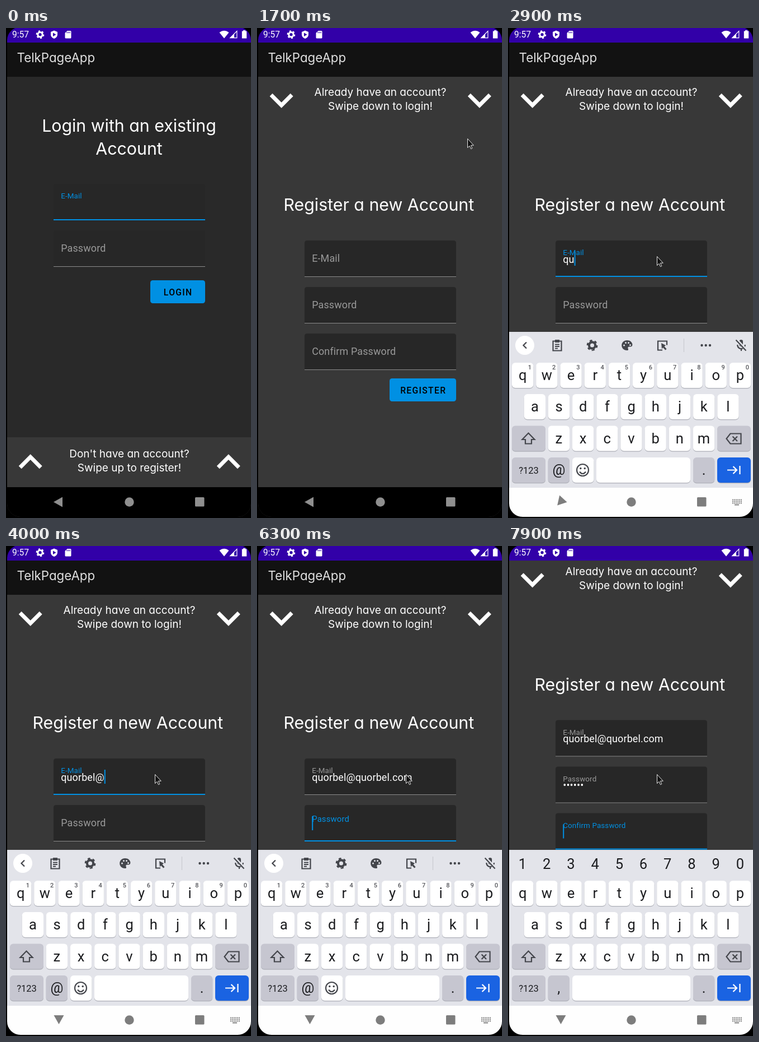
An HTML page that plays this animation: 438 by 874 pixels, repeating every 8000 ms.

```html
<!DOCTYPE html>
<html lang="en">
<head>
<meta charset="utf-8">
<title>Login and register</title>
<style>
html, body { margin: 0; width: 100%; height: 100%; overflow: hidden; background: #000; }
svg { display: block; width: 100%; height: 100%; font-family: Roboto, sans-serif; }
text { white-space: pre; }
.geo { font-family: Inter, sans-serif; font-feature-settings: "cv11" 1; font-optical-sizing: none; fill: #fff; }
.h { font-size: 30.3px; }
.hint { font-size: 19px; }
.mid { text-anchor: middle; }
.in { font-size: 17.9px; letter-spacing: .009em; }
.btn { font-size: 15.6px; font-weight: 500; letter-spacing: .089em; text-anchor: middle; }
.key { font-size: 25.5px; text-anchor: middle; fill: #1b1c1f; }
.sup { font-size: 11px; font-weight: 500; text-anchor: middle; fill: #55565b; }
.line { fill: none; stroke: #44464c; stroke-width: 2.2; }
</style>
</head>
<body>
<svg viewBox="0 0 438 874">
  <defs>
    <clipPath id="screen"><rect x="2" y="-2" width="436" height="874" rx="24"/></clipPath>
  </defs>
  <rect width="438" height="874"/>
  <g clip-path="url(#screen)">
    <rect y="26" width="438" height="794" fill="#292929"/>
    <g id="page">
      <g id="login">
        <g id="loginTitle" class="geo h mid">
          <text x="220" y="185">Login with an existing</text>
          <text x="220" y="226">Account</text>
        </g>
      </g>
      <rect id="panel" width="438" height="900" fill="#383838"/>
      <g id="reg">
        <text id="regTitle" class="geo h" y="326">Register a new Account</text>
      </g>
      <g id="bar">
        <g id="arrows" fill="#fff">
          <path d="M-4.590 3.410L0 -1.170L4.590 3.410L6 2L0 -4L-6 2z"/>
          <path d="M-4.590 3.410L0 -1.170L4.590 3.410L6 2L0 -4L-6 2z"/>
        </g>
        <g class="geo hint mid">
          <text id="hint1" x="220.5" y="766"></text>
          <text id="hint2" x="220.5" y="791"></text>
        </g>
      </g>
      <rect y="20" width="438" height="67" fill="#121212"/>
      <text class="geo" x="19.5" y="61" font-size="22.3" style="fill:#e0e0e0">TelkPageApp</text>
    </g>
    <rect y="-2" width="438" height="28" fill="#3200a8"/>
    <g id="status" fill="#fff">
      <text x="11" y="17.3" font-size="15.6">9:57</text>
      <path d="M86 4.500l6 2.400v4.600q0 5-6 7.600q-6 -2.600-6-7.600v-4.600z"/>
      <path d="M84 8.500l5.500 3.200l-5.500 3.200z" fill="#3200a8"/>
      <path d="M109.500 5h5.500q1.500 0 1.500 1.500v10.500q0 1.500-1.500 1.500h-8q-1.500 0-1.500-1.500v-8z"/>
      <path d="M109 6.800v2.400M111.500 6.800v2.400M114 6.800v2.400" stroke="#3200a8" stroke-width="1.2"/>
      <path d="M390 18.500L381.500 8Q390 1.500 398.500 8z"/>
      <path d="M400.800 17.700H412.800V5.500z" fill="none" stroke="#fff" stroke-width="1.2"/>
      <path d="M400 18L408 10V18z"/>
      <path d="M424 4h4v1.500h2.200v13h-8.400v-13h2.200z"/>
    </g>
    <rect y="819" width="438" height="55"/>
    <g id="board">
      <rect y="542" width="438" height="279" fill="#e3e4ea"/>
      <rect y="820" width="438" height="54" fill="#fefefe"/>
      <g id="keys"></g>
      <g id="mailKeys">
        <circle cx="30" cy="566" r="17" fill="#fff"/>
        <path class="line" d="M33 560.500l-5.500 5.500l5.500 5.500"/>
        <path class="line" d="M80.500 558.500h15v17h-15zM84 564.500h8M84 568h8M84 571.500h5"/>
        <path d="M84 556h8v5h-8z" fill="#44464c"/>
        <path d="M213 557c-13 0-13 18 0 18c3 0 2-2.500 1.500-3.500c-.8-2 .5-3 2-3h2.500c6 0 4-11.500-6-11.500z" fill="#44464c"/>
        <g fill="#e3e4ea"><circle cx="207.500" cy="566" r="1.5"/><circle cx="210.500" cy="561.500" r="1.5"/><circle cx="215.500" cy="561.500" r="1.5"/><circle cx="218.500" cy="565.500" r="1.5"/></g>
        <path class="line" d="M276 574.500h-8v-16h16v7"/>
        <path d="M274 562l8 4l-2.500 2l4 4.500l-2 2l-4.500-4.500l-2 2.500z" fill="#44464c"/>
        <path d="M314.500 554v24" stroke="#c6c7cd"/>
        <g fill="#44464c"><circle cx="346.500" cy="566" r="2.2"/><circle cx="353.700" cy="566" r="2.2"/><circle cx="361" cy="566" r="2.2"/></g>
        <rect x="413.500" y="556" width="6.500" height="12" rx="3.2" fill="#44464c"/>
        <path class="line" d="M410 565q1 7 7 7t7-7M417 572v4"/>
        <path d="M409 556.500l17 18" stroke="#e3e4ea" stroke-width="5"/>
        <path class="line" d="M407.500 556.500l18 19"/>
      </g>
      <g id="passKeys"></g>
      <g id="switcher" fill="#858585"></g>
    </g>
    <g id="nav">
      <path id="back" d="M-9.500 0L6.500 -9V9z"/>
      <circle cx="220.500" cy="845.500" r="8.2"/>
      <rect x="338" y="837" width="16.5" height="16.5" rx="1.5"/>
    </g>
  </g>
  <path id="mouse" d="M.5 .5V16.500L4 13.200L6.500 18.700L8.800 17.600L6.400 12.200H11.300z" fill="#111" stroke="#e8e8e8"/>
</svg>
<script>
const LOOP = 8000, STEP = 100;
const BLUE = '#0090e3', GREY = '#9a9a9a';
const MAIL = 'quorbel@quorbel.com', PASS = '123456';
const $ = id => document.getElementById(id);

// Tables of [time, value...], linear in between
const swipe = [[900, 0], [1000, .02], [1100, .1], [1200, .24], [1300, .4036], [1400, .6], [1500, .8], [1600, .95], [1700, 1]];
const mouse = [[500, 434, 650], [600, 415, 705], [700, 392, 743], [800, 385, 752], [900, 385, 752], [1000, 384, 710],
  [1100, 382, 570], [1200, 380, 390], [1300, 378, 264], [1400, 377, 215], [1700, 376, 197], [1800, 376, 197],
  [1900, 350, 240], [2000, 290, 370], [2100, 266, 407]];
const slide = [[2500, 335], [2600, 240], [2700, 120], [2800, 25], [2900, 0]];
const turn = [[2700, 0], [2800, -15], [2900, -48], [3000, -80], [3100, -90]];
const pan = [[7600, 0], [7700, -14], [7800, -52], [7900, -68.5]];
const mailTimes = [2800, 2900, 3000, 3100, 3400, 3600, 3800, 4000, 4200, 4400, 4500, 4700, 4900, 5300, 5400, 5600, 5800, 5900, 6100];
const passTimes = [6500, 6700, 6900, 7000, 7100, 7300];

const mix = (a, b, p) => a + (b - a) * p;
const typed = (times, t) => times.filter(s => s <= t).length;

function track(rows, t) {
  const i = rows.findIndex(r => r[0] > t);
  if (i === 0) return rows[0].slice(1);
  if (i < 0) return rows[rows.length - 1].slice(1);
  const a = rows[i - 1], b = rows[i], p = (t - a[0]) / (b[0] - a[0]);
  return a.slice(1).map((v, k) => mix(v, b[k + 1], p));
}

function set(el, attrs) {
  for (const k in attrs) el.setAttribute(k, attrs[k]);
}

function add(parent, tag, attrs = {}, text = '') {
  const el = document.createElementNS('http://www.w3.org/2000/svg', tag);
  set(el, attrs);
  el.textContent = text;
  return parent.appendChild(el);
}

const move = (el, x, y, more = '') => el.setAttribute('transform', `translate(${x} ${y}) ${more}`);
const show = (el, on) => { el.style.display = on ? '' : 'none'; };

// Each view fades by itself, so overlapping ones show through
function fade(group, alpha) {
  for (const el of group.children) el.setAttribute('opacity', alpha);
}

function gear(parent, x, y, r, color) {
  const ring = (rad, w, more) => add(parent, 'circle',
    { cx: x, cy: y, r: rad, fill: 'none', stroke: color, 'stroke-width': w, ...more });
  ring(r * .57, r * .42);
  ring(r * .85, r * .32, { pathLength: 12, 'stroke-dasharray': '1 1' });
}

// Filled text field; the returned function sets its geometry and state
function field(parent, name) {
  const g = add(parent, 'g');
  const box = add(g, 'path', { fill: '#272727' });
  const line = add(g, 'rect');
  const label = add(g, 'text', { class: 'in', x: 13.2 }, name);
  const value = add(g, 'text', { class: 'in', x: 13.2, y: 39.5, fill: '#fff' });
  const caret = add(g, 'rect', { y: 20, width: 2, height: 25, fill: BLUE });
  return (x, y, w, { focus = false, float = 0, text = '', caretOn = false } = {}) => {
    move(g, x, y);
    set(box, { d: `M0 65V4.500Q0 0 4.500 0H${w - 4.5}Q${w} 0 ${w} 4.500V65z` });
    const h = focus ? 2 : 1;
    set(line, { y: 65 - h, width: w, height: h, fill: focus ? BLUE : '#8c8c8c' });
    set(label, { y: mix(38.4, 26, float), fill: focus ? BLUE : GREY });
    label.style.fontSize = mix(17.9, 13.4, float) + 'px';
    value.textContent = text;
    show(caret, caretOn);
    if (caretOn) caret.setAttribute('x', 13.2 + (text ? value.getComputedTextLength() : 0));
  };
}

function button(parent, name) {
  const g = add(parent, 'g');
  const box = add(g, 'rect', { height: 41, rx: 4.5, fill: BLUE });
  const text = add(g, 'text', { class: 'btn', y: 26.5 }, name);
  return (x, y, w) => {
    move(g, x, y);
    box.setAttribute('width', w);
    text.setAttribute('x', w / 2 + .7);
  };
}

function key(parent, x, y, w, name = '', fill = '#fff', small = false) {
  add(parent, 'rect', { x, y: y + 1.3, width: w, height: 45, rx: 6, fill: '#aeb0b8' });
  add(parent, 'rect', { x, y, width: w, height: 45, rx: 6, fill });
  const t = add(parent, 'text', { class: 'key', x: x + w / 2, y: y + (small ? 29 : 31) }, name);
  if (small) t.style.fontSize = '16.5px';
}

function buildBoard() {
  const keys = $('keys'), mail = $('mailKeys'), pass = $('passKeys');
  const DARK = '#c6c6d0', pitch = 43.2;
  const row = (chars, x, y) => [...chars].forEach((c, i) => key(keys, x + i * pitch, y, 38.3, c));
  row('qwertyuiop', 7, 597);
  row('asdfghjkl', 28.7, 653);
  row('zxcvbnm', 71.7, 709.5);
  key(keys, 7, 709.5, 60, '', DARK);
  key(keys, 374, 709.5, 60, '', DARK);
  key(keys, 7, 766, 60, '?123', DARK, true);
  key(keys, 331, 766, 38.3, '.', DARK);
  key(keys, 374, 766, 60, '', '#1a63e2');
  const icon = (g, d, more) => add(g, 'path', { class: 'line', d, ...more });
  icon(keys, 'M36.500 722.500l11 11.500h-5.500v7.500h-11v-7.500h-5.500z');
  icon(keys, 'M397.500 723.500h19v18h-19l-7-9zM401.500 728.500l8.500 8.500M410 728.500l-8.500 8.500');
  icon(keys, 'M392 788.500h16M402.500 782l6.500 6.500l-6.500 6.500M414.500 781v15', { style: 'stroke:#fff' });

  [...'1234567890'].forEach((c, i) => {
    add(mail, 'text', { class: 'sup', x: 39 + i * pitch, y: 609 }, c);
    add(pass, 'text', { class: 'key', x: 26 + i * pitch, y: 576 }, c);
  });
  gear(mail, 150.5, 566, 9.8, '#44464c');
  key(mail, 71.7, 766, 38.3, '@', DARK);
  key(mail, 115, 766, 38.3);
  key(mail, 158, 766, 168);
  add(mail, 'circle', { class: 'line', cx: 133.5, cy: 788.5, r: 10.5 });
  icon(mail, 'M128 791.500q5.500 7 11 0');
  for (const cx of [129.8, 137.2]) add(mail, 'circle', { cx, cy: 785.5, r: 1.7, fill: '#44464c' });
  key(pass, 71.7, 766, 38.3, ',', DARK);
  key(pass, 115, 766, 211);

  for (let r = 0; r < 3; r++)
    for (let c = 0; c < 6; c++)
      add($('switcher'), 'rect', { x: 401 + c * 3, y: 840.5 + r * 3, width: 2, height: 2 });
  add($('switcher'), 'rect', { x: 405, y: 849.5, width: 8, height: 2 });
}

const login = { mail: field($('login'), 'E-Mail'), pass: field($('login'), 'Password'), go: button($('login'), 'LOGIN') };
const reg = {
  mail: field($('reg'), 'E-Mail'), pass: field($('reg'), 'Password'),
  again: field($('reg'), 'Confirm Password'), go: button($('reg'), 'REGISTER')
};
gear($('status'), 61, 11.7, 7.3, '#fff');
buildBoard();

function drawLogin(p) {
  const x = mix(85, 1, p), w = mix(271, 439, p), left = mix(258, 4, p);
  fade($('login'), 1 - p);
  move($('loginTitle'), 0, -153 * p);
  login.mail(x, mix(278, 21, p), w, { focus: true, float: 1 });
  login.pass(x, mix(361, 24, p), w);
  login.go(left, mix(450, 43, p), x + w - left);
}

function drawRegister(p, t) {
  const x = mix(3, 85, p), w = mix(435, 271, p);
  const n = typed(passTimes, t);
  fade($('reg'), p);
  set($('regTitle'), { x: mix(1, 47.5, p), y: mix(851, 326, p) });
  const onMail = t >= 2400 && t < 6200, onPass = t >= 6200 && t < 7700, onAgain = t >= 7700;
  reg.mail(x, mix(887, 379, p), w, {
    focus: onMail, float: track([[2300, 0], [2600, 1]], t)[0],
    text: MAIL.slice(0, typed(mailTimes, t)), caretOn: onMail && t >= 2500
  });
  reg.pass(x, mix(885, 462, p), w, {
    focus: onPass, float: track([[6100, 0], [6400, 1]], t)[0],
    text: onAgain ? '•'.repeat(n) : n ? '•'.repeat(n - 1) + PASS[n - 1] : '', caretOn: onPass
  });
  reg.again(x, mix(884, 545, p), w, {
    focus: onAgain, float: track([[7600, 0], [7800, 1]], t)[0], caretOn: onAgain
  });
  reg.go(x + w - 119, mix(891, 625, p), 119);
}

function drawBar(p) {
  const up = p < .5;
  $('panel').setAttribute('y', mix(730, 87, p));
  move($('bar'), 0, -645.5 * p);
  const [a, b] = $('arrows').children;
  move(a, 43.7, 774.2, `rotate(${180 * p}) scale(3.5)`);
  move(b, 397.8, 774.2, `rotate(${-180 * p}) scale(3.5)`);
  $('hint1').textContent = up ? "Don't have an account?" : 'Already have an account?';
  $('hint2').textContent = up ? 'Swipe up to register!' : 'Swipe down to login!';
}

function render(t) {
  const [p] = track(swipe, t);
  drawLogin(p);
  drawBar(p);
  drawRegister(p, t);
  move($('page'), 0, track(pan, t)[0]);

  const open = t >= 2600, digits = t >= 6400, [angle] = track(turn, t);
  show($('board'), open);
  move($('board'), 0, track(slide, t)[0]);
  show($('mailKeys'), !digits);
  show($('passKeys'), digits);
  $('nav').setAttribute('fill', t >= 2800 ? '#7d7d7d' : '#8f8f8f');
  move($('back'), 94.5, 845.5 + angle / 45, `rotate(${angle})`);

  show($('mouse'), t >= 500);
  move($('mouse'), ...track(mouse, t));
}

let last = -1;
const start = performance.now();
function tick() {
  const t = Math.floor((performance.now() - start) % LOOP / STEP) * STEP;
  if (t !== last) render(last = t);
  requestAnimationFrame(tick);
}
tick();
</script>
</body>
</html>
```
